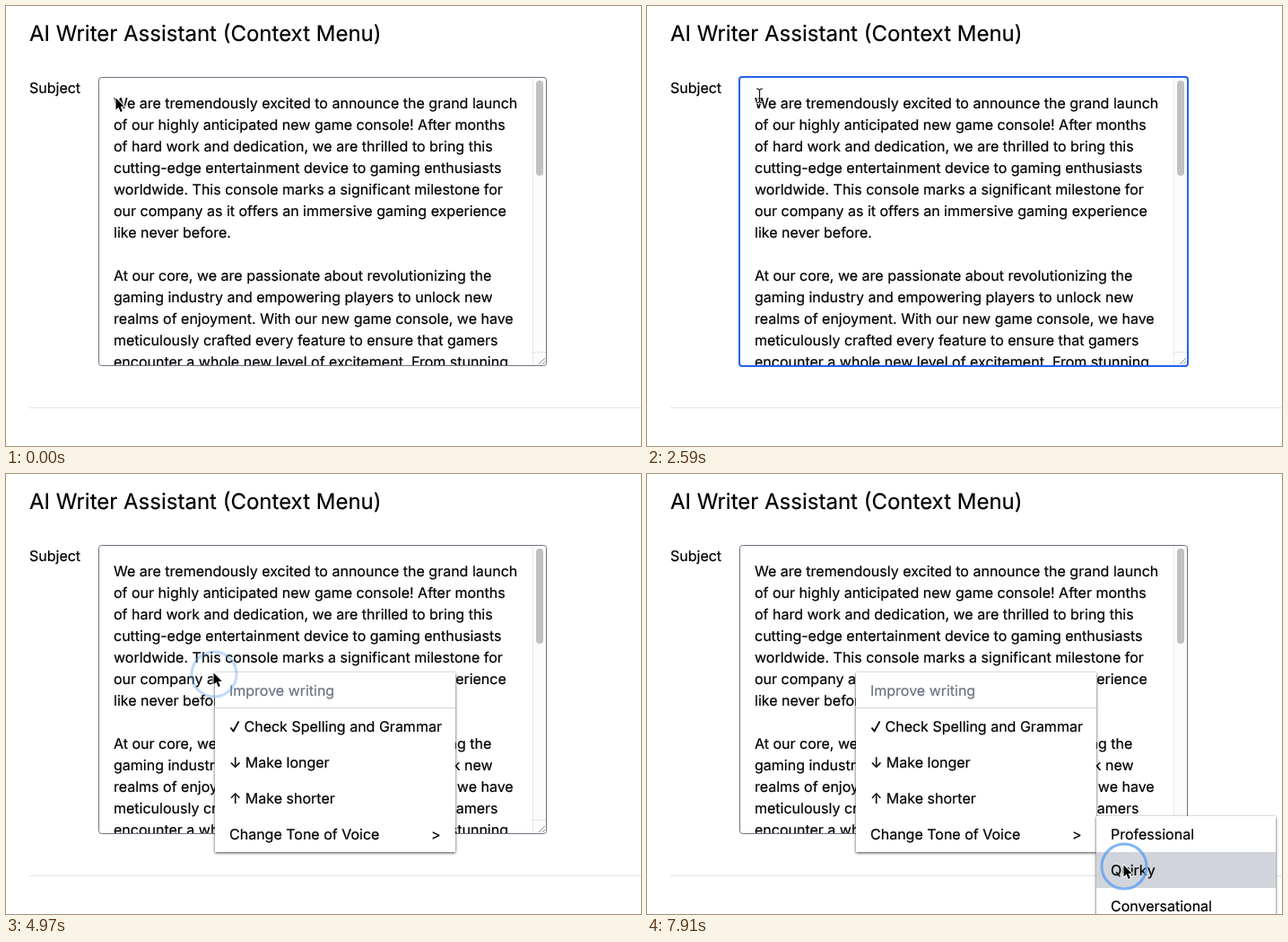
An HTML page with a canvas for the animation above (8000 ms loop, 708x490 px).

```html
<!DOCTYPE html>
<html lang="en">
<head>
<meta charset="utf-8">
<title>AI Writer Assistant</title>
<style>
html, body { margin: 0; width: 100%; height: 100%; overflow: hidden; background: #fff; }
canvas { display: block; }
</style>
</head>
<body>
<canvas id="stage" width="708" height="490"></canvas>
<script>
const ctx = document.getElementById('stage').getContext('2d');
ctx.textRendering = 'geometricPrecision';
ctx.lineJoin = 'round';
const LOOP = 8000, STEP = 70, LAST = 7910;
const LEFT = 120, TOP = 96, LINE = 24;

const lines = [
  'We are tremendously excited to announce the grand launch',
  'of our highly anticipated new game console! After months',
  'of hard work and dedication, we are thrilled to bring this',
  'cutting-edge entertainment device to gaming enthusiasts',
  'worldwide. This console marks a significant milestone for',
  'our company as it offers an immersive gaming experience',
  'like never before.',
  '',
  'At our core, we are passionate about revolutionizing the',
  'gaming industry and empowering players to unlock new',
  'realms of enjoyment. With our new game console, we have',
  'meticulously crafted every feature to ensure that gamers',
  'encounter a whole new level of excitement. From stunning'
];
const LAST_SELECTED = 6;

// Pointer path: time, x, y, eased leg
const path = [
  [0, 122, 102],
  [70, 122, 102],
  [420, 193, 153, true],
  [1680, 193, 153],
  [2030, 150, 120, true],
  [2170, 150, 120],
  [2520, 125, 100, true],
  [2940, 125, 100],
  [3570, 231, 214],
  [3850, 252, 252],
  [4130, 252, 252],
  [4480, 231, 221, true],
  [5110, 231, 221],
  [5530, 306, 341],
  [5740, 330, 401],
  [6090, 520, 403, true],
  [6300, 520, 403],
  [7210, 531, 435, true],
  [8000, 531, 435]
];

// Press indicator: fade-in start, fade-out start
const presses = [[770, 1400], [2590, 3990], [4620, 4900], [7490, 9000]];
const FADE = 140;

const FOCUS_AT = 910, IBEAM_AT = 2030, DRAG_AT = 2940, DROP_AT = 3990;
const MENU_AT = 4830, SUBMENU_AT = 5740;

const clamp = v => Math.max(0, Math.min(1, v));
const smooth = v => v * v * (3 - 2 * v);

function pointerAt(t) {
  const i = Math.max(1, path.findIndex(p => p[0] >= t));
  const [t0, x0, y0] = path[i - 1], [t1, x1, y1, eased] = path[i];
  let k = clamp((t - t0) / (t1 - t0));
  if (eased) k = smooth(k);
  return { x: x0 + (x1 - x0) * k, y: y0 + (y1 - y0) * k };
}

// A hairline outline gives the slightly heavier look of smoothed type
function text(str, x, y, size = 16, color = '#000') {
  ctx.font = `400 ${size}px Inter, sans-serif`;
  ctx.fillStyle = ctx.strokeStyle = color;
  ctx.lineWidth = 0.2;
  ctx.fillText(str, x, y);
  ctx.strokeText(str, x, y);
}

function rect(x, y, w, h, color) {
  ctx.fillStyle = color;
  ctx.fillRect(x, y, w, h);
}

function stroke(points, color, width) {
  ctx.beginPath();
  points.forEach(([x, y], i) => i ? ctx.lineTo(x, y) : ctx.moveTo(x, y));
  ctx.strokeStyle = color;
  ctx.lineWidth = width;
  ctx.stroke();
}

function drawSelection(p) {
  ctx.font = '400 16px Inter, sans-serif';
  const row = Math.max(0, Math.min(LAST_SELECTED, Math.floor((p.y - TOP) / LINE)));
  for (let i = 0; i < row; i++) {
    rect(LEFT, TOP + i * LINE, ctx.measureText(lines[i]).width + 9, LINE, '#b3d7ff');
  }
  let width = 0;
  for (let n = 1; n <= lines[row].length; n++) {
    const next = ctx.measureText(lines[row].slice(0, n)).width;
    if (p.x - LEFT < (width + next) / 2) break;
    width = next;
  }
  rect(LEFT, TOP + row * LINE, width, LINE, '#b3d7ff');
}

function drawTextarea(t) {
  const focused = t >= FOCUS_AT && t < MENU_AT;
  ctx.save();
  ctx.beginPath();
  ctx.rect(104, 80, 498, 320);
  ctx.clip();
  if (focused && t >= DRAG_AT) drawSelection(pointerAt(Math.min(t, DROP_AT)));
  lines.forEach((line, i) => text(line, LEFT, TOP + 18 + i * LINE));
  rect(587, 80, 15, 320, '#fcfcfc');
  rect(587, 80, 1, 320, '#e8e8e8');
  rect(587, 385, 15, 1, '#e4e4e4');
  ctx.beginPath();
  ctx.roundRect(591, 83, 8, 106, 4);
  ctx.fillStyle = '#c1c1c1';
  ctx.fill();
  stroke([[594, 399], [601, 392]], '#777', 0.8);
  stroke([[598, 399], [601, 396]], '#777', 0.8);
  ctx.restore();

  ctx.beginPath();
  if (focused) ctx.roundRect(103, 79, 500, 322, 3);
  else ctx.roundRect(103.5, 79.5, 499, 321, 3);
  ctx.strokeStyle = focused ? '#2563eb' : '#6b7280';
  ctx.lineWidth = focused ? 2 : 1;
  ctx.stroke();
}

function panel(x, y, w, h) {
  ctx.save();
  ctx.shadowColor = 'rgba(0,0,0,.75)';
  ctx.shadowBlur = 3;
  ctx.shadowOffsetY = 1;
  rect(x, y, w, h, '#fff');
  ctx.restore();
}

function drawMenu(p, submenu) {
  panel(233, 221, 268, 200);
  const overSub = submenu && p.x >= 501;
  const hovered = !overSub && p.x >= 233 ? Math.floor((p.y - 261) / 40) : -1;
  if (hovered >= 0 && hovered < 4) rect(233, 261 + hovered * 40, 268, 40, '#d1d5db');
  rect(233, 260, 268, 1, '#d1d5db');
  text('Improve writing', 249, 247, 16, '#6b7280');
  stroke([[250.5, 282.5], [253.5, 286.5], [259.5, 275.5]], '#000', 1.8);
  text('Check Spelling and Grammar', 265.5, 287);
  text('↓ Make longer', 249, 327);
  text('↑ Make shorter', 249, 367);
  text('Change Tone of Voice', 249, 407);
  text('>', 474, 407);

  if (!submenu) return;
  panel(501, 381, 200, 160);
  if (overSub) rect(501, 381 + Math.floor((p.y - 381) / 40) * 40, 200, 40, '#d1d5db');
  ['Professional', 'Quirky', 'Conversational'].forEach((label, i) => text(label, 517, 407 + i * 40));
}

function drawArrow(x, y) {
  const shape = [[0, 0], [0, 13], [3, 10.3], [5.2, 15.4], [7.3, 14.4], [5.2, 9.5], [9.2, 9.3]];
  ctx.beginPath();
  shape.forEach(([dx, dy]) => ctx.lineTo(x + 0.5 + dx, y + 0.5 + dy));
  ctx.closePath();
  ctx.strokeStyle = '#fff';
  ctx.lineWidth = 2;
  ctx.stroke();
  ctx.fillStyle = '#000';
  ctx.fill();
}

function drawIBeam(x, y) {
  for (const [color, width] of [['#fff', 2.6], ['#111', 1.2]]) {
    stroke([[x - 3.5, y - 8], [x - 1, y - 7.5], [x, y - 6], [x, y + 6], [x - 1, y + 7.5], [x - 3.5, y + 8]], color, width);
    stroke([[x + 3.5, y - 8], [x + 1, y - 7.5], [x, y - 6]], color, width);
    stroke([[x, y + 6], [x + 1, y + 7.5], [x + 3.5, y + 8]], color, width);
    stroke([[x - 2, y + 3], [x + 2, y + 3]], color, 1);
  }
}

function drawPointer(t, p) {
  for (const [down, up] of presses) {
    const alpha = Math.min(clamp((t - down) / FADE), 1 - clamp((t - up) / FADE));
    if (alpha <= 0) continue;
    ctx.globalAlpha = alpha;
    ctx.beginPath();
    ctx.arc(p.x + 1, p.y + 2, 25, 0, Math.PI * 2);
    ctx.strokeStyle = 'rgba(86,156,242,.75)';
    ctx.lineWidth = 3;
    ctx.stroke();
    ctx.globalAlpha = 1;
  }
  if (t >= IBEAM_AT && t < MENU_AT) drawIBeam(p.x + 0.5, p.y);
  else drawArrow(p.x, p.y);
}

function draw(now) {
  const t = Math.min(LAST, Math.floor((now % LOOP) / STEP) * STEP);
  const p = pointerAt(t);
  rect(0, 0, 708, 490, '#fff');
  text('AI Writer Assistant (Context Menu)', 26, 39, 24);
  text('Subject', 26, 97);
  rect(26, 447, 682, 1, '#e2e4e8');
  drawTextarea(t);
  if (t >= MENU_AT) drawMenu(p, t >= SUBMENU_AT);
  drawPointer(t, p);
}

const start = performance.now();
function tick() {
  draw(performance.now() - start);
  requestAnimationFrame(tick);
}
tick();
</script>
</body>
</html>
```
